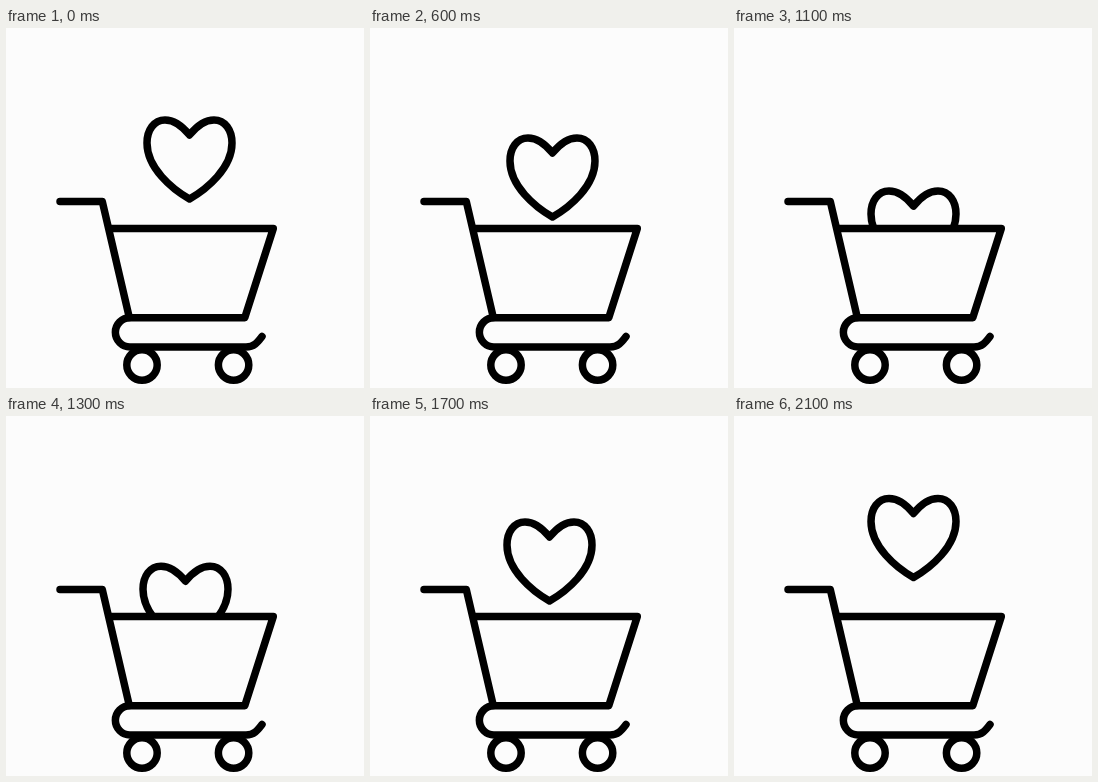
Write an HTML page that moves like this. It is 358 by 360 pixels and loops after 2200 ms.

```html
<!DOCTYPE html>
<html lang="en">
<head>
<meta charset="utf-8">
<title>Heart and cart</title>
<style>
  html, body { margin: 0; width: 100%; height: 100%; overflow: hidden; background: #fcfcfc; }
  svg { display: block; width: 100vw; height: 100vh; }
  .ink { fill: none; stroke: #000; stroke-width: 7.5; stroke-linecap: round; stroke-linejoin: round; }
</style>
</head>
<body>
<svg viewBox="0 0 358 360">
  <clipPath id="aboveRim"><rect width="358" height="200"/></clipPath>
  <g clip-path="url(#aboveRim)">
    <path id="heart" class="ink" d="M183.5 107C177 99 168 92 159 92C148 92 141 102 141 115C141 140 166 161 183.5 171C201 161 226 140 226 115C226 102 219 92 208 92C199 92 190 99 183.5 107Z"/>
  </g>
  <g class="ink">
    <path d="M54 173.5H96.3L123.3 289.5"/>
    <path d="M104 200.5H267.3L238.8 289.7H124A14.65 14.65 0 0 0 124 319H240C248 319 251.5 314.5 256 308.5"/>
    <circle cx="136" cy="337" r="15.2"/>
    <circle cx="227.6" cy="337" r="15.2"/>
  </g>
</svg>
<script>
  const heart = document.getElementById('heart');
  const STEP = 100, STEPS = 22, BOUNCE = 12, DRIFT = -4, DEPTH = 71;

  // Speeds up while falling, slows down while rising.
  const fall = n => n * (2.72 - 0.305 * n + 0.0586 * n * n);
  const rise = n => {
    const m = n - 15;
    return 33.5 - 9.75 * m + 0.646 * m * (m - 2);
  };

  function draw() {
    const n = Math.floor(performance.now() / STEP) % STEPS;
    const falling = n < BOUNCE;
    const y = falling ? fall(n) : rise(n);
    const x = falling ? DRIFT * y / DEPTH : DRIFT;
    heart.setAttribute('transform', `translate(${x} ${y})`);
    requestAnimationFrame(draw);
  }
  draw();
</script>
</body>
</html>
```
